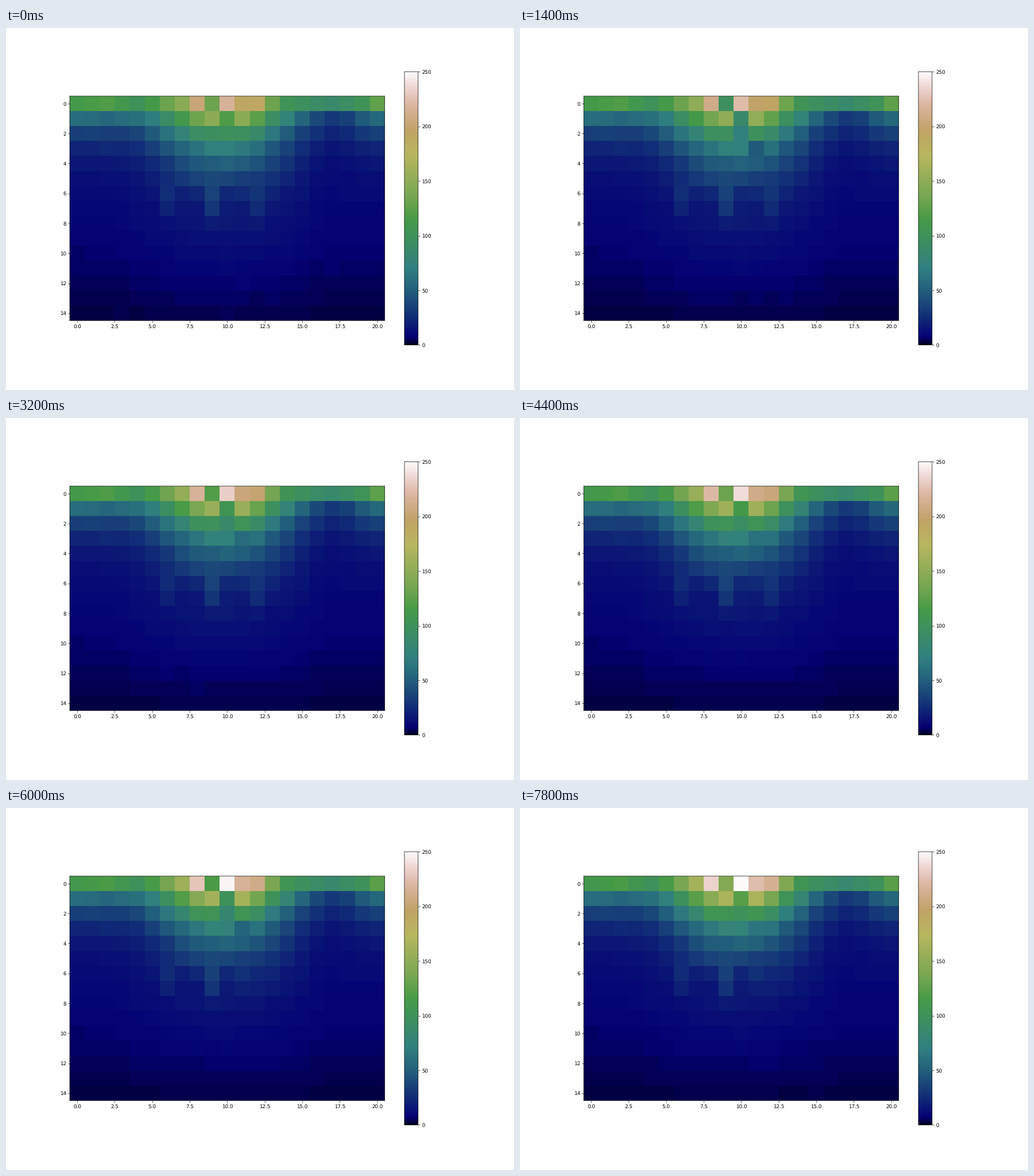
Recreate the animation shown at these times as a matplotlib script. Size 885 by 632 pixels, loop 8000 ms.

```python
import numpy as np
import matplotlib.pyplot as plt
from matplotlib.animation import FuncAnimation

W, H, DPI = 885, 632, 63.2
ROWS, COLS = 15, 21
FRAMES, STEP_MS = 40, 200

row = np.arange(ROWS)[:, None]
col = np.arange(COLS)[None, :]

# Level along the top row: columns and heights, linear in between
TOP_X = [0, 2, 4, 5, 7, 8, 10, 11, 12, 13, 14, 17, 19, 20]
TOP_Y = [114, 120, 101, 114, 148, 204, 216, 192, 191, 132, 103, 87, 103, 127]

# The dark streak deepens or recovers at these moments (seconds)
DIP_T = [0, 0.8, 2.6, 3.8, 4.8, 7.4]
DIP = [0, 0.28, 0.15, 0.10, 0.22, 0.08]
TONGUE_END = 4.6

GRAIN = 1 + 0.05 * np.random.default_rng(4).uniform(-1, 1, (ROWS, COLS))
GRAIN[0] = 1


def bell(x, mid, width, power=2):
    return np.exp(-(abs(x - mid) / width) ** power)


def background():
    """Quickly fading surface layer over a slowly fading floor."""
    gap = 1 - 0.55 * bell(col, 17, 2)
    return 87 * np.exp(-row / 1.6) * gap + 10.5 - 0.036 * row ** 2


def plume(progress):
    """Central hump that widens with depth and grows near the surface."""
    height = 130 * np.exp(-row / 3) * (1 + 0.25 * progress * (1 - row / 5))
    return height * bell(col, 9.7, 3.4 + 0.17 * row, 2.5)


def tongues(now):
    """Every third column reaches deeper; the right side fades out."""
    ripple = 9 * np.cos(2 * np.pi * col / 3) * bell(col, 9, 4, 4)
    if now >= TONGUE_END:
        ripple = ripple * (col < 11)
    return ripple * bell(row, 6.5, 1)


def surface(progress):
    swell = 0.22 * bell(col[0], 9.7, 3.8) - 0.03
    return np.interp(col[0], TOP_X, TOP_Y) * (1 + progress * swell)


def levels(frame):
    now = frame * STEP_MS / 1000
    progress = frame / (FRAMES - 1)
    grid = (background() + plume(progress) + tongues(now)) * GRAIN
    grid[0] = surface(progress)
    dip = DIP[np.searchsorted(DIP_T, now + 1e-6) - 1]
    for r in range(4):
        shade = max(0, 0.37 - 0.15 * r)
        grid[r, 9 + (r + 1) // 2] *= (1 - shade) * (1 - dip)
    return grid


plt.rcParams.update({"font.family": "DejaVu Sans", "font.size": 10,
                     "text.hinting": "none", "path.snap": False})
# The tiny extra keeps the pixel size from rounding down
fig = plt.figure(figsize=((W + 0.01) / DPI, (H + 0.01) / DPI), dpi=DPI,
                 facecolor="white")
fig.subplots_adjust(left=0.1255, right=0.9005, bottom=0.1243, top=0.8793)
ax = fig.add_subplot()
image = ax.imshow(levels(0), cmap="gist_earth", vmin=0, vmax=250,
                  interpolation="nearest")
ax.set_xticks(np.arange(0, 20.1, 2.5))
ax.set_yticks(range(0, ROWS, 2))
fig.colorbar(image, ax=ax, ticks=range(0, 251, 50))


def update(frame):
    image.set_data(levels(frame))
    return [image]


anim = FuncAnimation(fig, update, frames=FRAMES, interval=STEP_MS,
                     repeat=True, repeat_delay=0, blit=False)
plt.show()
```
